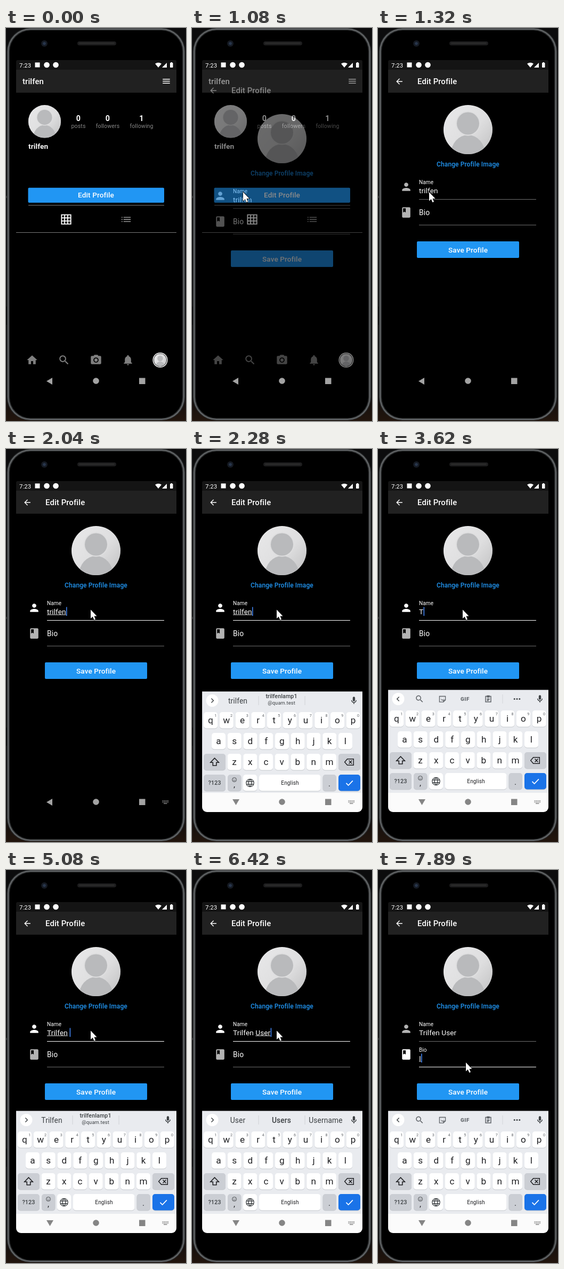
Recreate the animation shown at these times as an HTML page with a canvas. Size 338 by 735 pixels, loop 8000 ms.

```html
<!DOCTYPE html>
<html lang="en">
<head>
<meta charset="utf-8">
<title>Edit profile</title>
<style>
html, body { margin: 0; width: 100%; height: 100%; overflow: hidden; background: #0b0b0b; }
canvas { display: block; width: 338px; height: 735px; }
</style>
</head>
<body>
<canvas id="stage"></canvas>
<script>
const W = 338, H = 735, LOOP = 8000;
const BLUE = '#2196f3', GREY = '#7f7f7f', INK = '#3c4043';
const NICK = 'trilfen', MAIL = 'trilfenlamp1';
const dpr = Math.max(1, window.devicePixelRatio || 1);

const ICONS = {
  home: 'M10 20v-6h4v6h5v-8h3L12 3 2 12h3v8z',
  search: 'M15.5 14h-.79l-.28-.27C15.41 12.59 16 11.11 16 9.5 16 5.91 13.09 3 9.5 3S3 5.91 3 9.5 5.91 16 9.5 16c1.61 0 3.09-.59 4.23-1.57l.27.28v.79l5 4.99L20.49 19l-4.99-5zm-6 0C7.01 14 5 11.99 5 9.5S7.01 5 9.5 5 14 7.01 14 9.5 11.99 14 9.5 14z',
  camera: 'M9 2L7.17 4H4c-1.1 0-2 .9-2 2v12c0 1.1.9 2 2 2h16c1.1 0 2-.9 2-2V6c0-1.1-.9-2-2-2h-3.17L15 2zM12 7a5 5 0 1 0 0 10 5 5 0 0 0 0-10zM12 8.8a3.2 3.2 0 1 0 0 6.4 3.2 3.2 0 0 0 0-6.4z',
  bell: 'M12 22c1.1 0 2-.9 2-2h-4c0 1.1.89 2 2 2zm6-6v-5c0-3.07-1.64-5.64-4.5-6.32V4c0-.83-.67-1.5-1.5-1.5s-1.5.67-1.5 1.5v.68C7.63 5.36 6 7.92 6 11v5l-2 2v1h16v-1z',
  list: 'M3 11h2v2H3zM3 15h2v2H3zM3 7h2v2H3zM7 11h14v2H7zM7 15h14v2H7zM7 7h14v2H7z',
  menu: 'M3 16h18v2H3zM3 11h18v2H3zM3 6h18v2H3z',
  back: 'M20 11H7.83l5.59-5.59L12 4l-8 8 8 8 1.41-1.41L7.83 13H20z',
  person: 'M12 12c2.21 0 4-1.79 4-4s-1.79-4-4-4-4 1.79-4 4 1.79 4 4 4zm0 2c-2.67 0-8 1.34-8 4v2h16v-2c0-2.66-5.33-4-8-4z',
  book: 'M18 2H6c-1.1 0-2 .9-2 2v16c0 1.1.9 2 2 2h12c1.1 0 2-.9 2-2V4c0-1.1-.9-2-2-2zM6 4h5v8l-2.5-1.5L6 12z',
  mic: 'M12 14c1.66 0 3-1.34 3-3V5c0-1.66-1.34-3-3-3S9 3.34 9 5v6c0 1.66 1.34 3 3 3zm5-3c0 2.76-2.24 5-5 5s-5-2.24-5-5H5c0 3.53 2.61 6.43 6 6.92V21h2v-3.08c3.39-.49 6-3.39 6-6.92z',
  cursor: 'M0 0V16.5L3.8 13 6.4 19 9 17.9 6.5 12H11.5z',
  // stroked icons
  grid: 'M3 3h18v18H3zM9 3v18M15 3v18M3 9h18M3 15h18',
  shift: 'M12 3L2.5 13H8v7h8v-7h5.5z',
  erase: 'M8 5H22V19H8L2 12zM11.5 8.5l7 7M18.5 8.5l-7 7',
  globe: 'M12 2a10 10 0 1 0 0 20 10 10 0 0 0 0-20zM12 2C6.5 7 6.5 17 12 22C17.5 17 17.5 7 12 2M3.5 8.5h17M3.5 15.5h17',
  check: 'M4 12.5l5.5 5.5L20.5 6.5',
  next: 'M9.5 6l6 6-6 6',
  prev: 'M14.5 6l-6 6 6 6',
  sticker: 'M3 4h18v11l-6 6H3zM15 21v-6h6M8 9v1M15 9v1M8 13c1 3 5 3 6 1',
  clip: 'M4 4h16v17H4zM9 2.5h6v4H9zM8 11h8M8 14h8M8 17h5',
  smile: 'M12 2a10 10 0 1 0 0 20 10 10 0 0 0 0-20zM8.5 8v2M15.5 8v2M7 14c2 4 8 4 10 0'
};
for (const k in ICONS) ICONS[k] = new Path2D(ICONS[k]);

function surface(el) {
  el.width = W * dpr;
  el.height = H * dpr;
  const c = el.getContext('2d');
  c.scale(dpr, dpr);
  return c;
}
const stage = surface(document.getElementById('stage'));
const layer = surface(document.createElement('canvas'));
let g = stage;

function box(x, y, w, h, color, r = 0) {
  g.fillStyle = color;
  g.beginPath();
  g.roundRect(x, y, w, h, r);
  g.fill();
}
function disc(x, y, r, color) {
  g.fillStyle = color;
  g.beginPath();
  g.arc(x, y, r, 0, 7);
  g.fill();
}
function poly(color, ...p) {
  g.fillStyle = color;
  g.beginPath();
  for (let i = 0; i < p.length; i += 2) g.lineTo(p[i], p[i + 1]);
  g.fill();
}
function icon(name, x, y, scale, color, line = 0) {
  g.save();
  g.translate(x - 12 * scale, y - 12 * scale);
  g.scale(scale, scale);
  if (line) {
    g.strokeStyle = color;
    g.lineWidth = line;
    g.stroke(ICONS[name]);
  } else {
    g.fillStyle = color;
    g.fill(ICONS[name], 'evenodd');
  }
  g.restore();
}
// y is the middle of the capitals; returns the width
function text(s, x, y, size, color = '#fff', weight = 400, align = 'left', gap = 0.1) {
  g.font = `${weight} ${size}px Roboto, sans-serif`;
  g.letterSpacing = gap + 'px';
  g.textAlign = align;
  g.fillStyle = color;
  g.fillText(s, x, y + size * 0.355);
  return g.measureText(s).width;
}
const label = (s, x, y, size, color, weight) => text(s, x, y, size, color, weight, 'center');

// value of the last entry that has begun
function at(list, now) {
  let hit = list[0];
  for (const e of list) if (e[0] <= now) hit = e;
  return hit[1];
}
function track(keys, now) {
  let i = 0;
  while (i < keys.length - 2 && keys[i + 1][0] <= now) i++;
  const [t0, x0, y0] = keys[i], [t1, x1, y1] = keys[i + 1];
  const p = Math.min(1, (now - t0) / (t1 - t0));
  return [x0 + (x1 - x0) * p, y0 + (y1 - y0) * p];
}

const TYPED = [
  [0, NICK], [2890, 'trilfe'], [3010, 'tril'], [3130, 'tr'], [3250, ''],
  [3620, 'T'], [3990, 'Tr'], [4230, 'Tri'], [4350, 'Tril'], [4470, 'Trilf'],
  [4600, 'Trilfe'], [4840, 'Trilfen'], [5080, 'Trilfen '], [5320, 'Trilfen U'],
  [5570, 'Trilfen Us'], [5930, 'Trilfen Use'], [6180, 'Trilfen User']
];
const HINTS = [
  [0, [NICK, MAIL, '']], [3010, ['tril', 'trip', 'trial']], [3250, null],
  [3740, ['T', 'The', 'This']], [4350, ['Tri', 'Trip', 'Trial']],
  [4600, ['Trilf', 'Trill', 'Trifle']], [4840, ['Trilfen', MAIL, '']],
  [5320, ['U', 'Up', 'Us']], [5570, ['Us', 'Use', 'Using']],
  [5930, ['Use', 'User', 'Used']], [6180, ['User', 'Users', 'Username']], [6910, null]
];
const MOUSE = [
  [0, -20, 330], [240, 0, 322], [340, 14, 314], [460, 45, 303], [590, 78, 300],
  [710, 96, 307], [1335, 96, 307], [1450, 118, 303], [1680, 159, 300.5],
  [6560, 159, 300.5], [6680, 161, 316], [6800, 165, 345], [6920, 165, 360]
];
const BIO_FOCUS = 6910;

function phone() {
  box(0, 0, W, H, '#0c0c0d');
  const rust = g.createLinearGradient(0, 685, 0, H);
  rust.addColorStop(0, 'rgba(40,24,14,0)');
  rust.addColorStop(1, '#22150d');
  box(0, 685, W, 50, rust);
  box(0, 314, 2, 4, '#333');
  box(0, 521, 2, 34, '#000');
  box(1.5, 0, 335, 734, '#2b2d2e', 44);
  box(3, 1, 332, 732, '#66696b', 43);
  box(5, 3, 328, 728, '#303233', 41);
  box(7, 4.5, 324, 725, '#000', 39);
  box(134, 25, 73, 7.5, '#1d1d1e', 4);
  box(137, 27, 67, 3, '#292929', 2);
  disc(72, 29, 6, '#151a22');
  disc(72, 29, 2.8, '#28364c');
}

function avatar(x, y, r) {
  const k = r / 46;
  g.save();
  g.translate(x, y);
  g.scale(k, k);
  g.beginPath();
  g.arc(0, 0, 46, 0, 7);
  g.clip();
  const light = g.createLinearGradient(-35, -30, 35, 30);
  light.addColorStop(0, '#e6e6e7');
  light.addColorStop(0.6, '#dededf');
  light.addColorStop(1, '#cacacb');
  box(-46, -46, 92, 92, light);
  g.fillStyle = '#b9babc';
  g.beginPath();
  g.ellipse(0, 46, 32, 36, 0, 0, 7);
  g.fill();
  disc(0, -11.5, 23, '#dededf');
  disc(0, -11.5, 21, '#b9babc');
  g.restore();
}

function page(barEnd) {
  box(19, 60, 301, 583, '#000');
  box(19, 60, 301, barEnd - 60, '#212121');
}

function profile() {
  page(121);
  text(NICK, 31, 100, 14.9, '#fff', 500);
  icon('menu', 301, 99.5, 0.75, '#fff');
  avatar(72.5, 174.8, 30.7);
  [['0', 'posts', 136], ['0', 'followers', 191], ['1', 'following', 254.5]].forEach(([n, s, x]) => {
    label(n, x, 169, 14.3, '#fff', 700);
    label(s, x, 183, 10.6, '#868686');
  });
  text(NICK, 42, 221.5, 13.6, '#fff', 700);
  box(41.5, 298.7, 255.5, 28, BLUE, 2);
  label('Edit Profile', 169, 312.4, 13.6, '#fff', 500);
  box(42, 331, 255, 1, '#7a7a7a');
  icon('grid', 113, 358, 0.96, '#fff', 2);
  icon('list', 225.5, 358, 0.96, GREY);
  box(19, 382, 301, 1, '#7a7a7a');
  ['home', 'search', 'camera', 'bell'].forEach((n, i) => icon(n, 49 + 60 * i, 621, 0.97, GREY));
  disc(289.5, 621, 14, '#fff');
  disc(289.5, 621, 12.6, '#222');
  avatar(289.5, 621, 11.7);
}

function field(y, value, focused, composing, caret) {
  const w = value ? text(value, 77, y, 13.6) : 0;
  const words = value.trimEnd();
  if (composing && words) {
    const start = words.lastIndexOf(' ') + 1;
    const x0 = g.measureText(words.slice(0, start)).width;
    box(77 + x0, y + 5.5, g.measureText(words).width - x0, 1, '#e8e8e8');
  }
  if (focused && caret) box(77 + w + 0.3, y - 8.5, 1.6, 16.5, '#4285f4');
  box(77, y + 16, 220, 1, focused ? '#fff' : '#6f6f6f');
}

function editPage(now, shift) {
  const onName = now >= 1920 && now < BIO_FOCUS, onBio = now >= BIO_FOCUS;
  page(121 - shift);
  icon('back', 40, 100, 0.73, '#fff');
  text('Edit Profile', 74, 100, 14.9, '#fff', 500);
  avatar(169, 190, 46);
  label('Change Profile Image', 169, 254.5, 12, BLUE, 500);

  icon('person', 53, 297, 0.97, onName ? '#fff' : '#b3b3b3');
  text('Name', 77, 288, 10);
  const composing = onName && now >= 2040 && !(now >= 3250 && now < 3740);
  field(304, at(TYPED, now), onName, composing, !(now >= 2640 && now < 2890));

  icon('book', 53, 345, 0.97, onBio ? '#fff' : '#b3b3b3');
  const lift = Math.max(0, Math.min(1, (now - 6850) / 170));
  text('Bio', 77, 345 - 9 * lift, 13.8 - 3.8 * lift);
  field(352, now >= 7640 ? 'I' : '', onBio, onBio, true);

  box(73, 399, 192, 31, BLUE, 2);
  label('Save Profile', 169, 414.7, 13.6, '#fff', 500);
}

function statusBar() {
  box(19, 60, 301, 18, '#141414');
  text('7:23', 25, 69.5, 11.3);
  box(54.5, 64.5, 9, 9, '#fff');
  disc(76.5, 69, 5.3, '#fff');
  disc(93.5, 69, 5.3, '#fff');
  g.fillStyle = '#fff';
  g.beginPath();
  g.moveTo(286, 74);
  g.lineTo(280, 66.8);
  g.quadraticCurveTo(286, 62.6, 292, 66.8);
  g.fill();
  poly('#fff', 293, 74, 302, 74, 302, 65);
  box(308, 65, 5.5, 9, '#fff', 1);
  box(309.5, 64, 2.5, 2, '#fff');
}

function navBar(now) {
  const light = now >= 2160;
  const c = light ? '#858585' : '#a3a3a3';
  box(19, 643, 301, 36, light ? '#fbfbfb' : '#000');
  if (light) poly(c, 76, 655, 89, 655, 82.5, 666);
  else poly(c, 76, 660.5, 87, 654, 87, 667);
  disc(169, 660, 5.8, c);
  box(250, 654.5, 11.5, 11.5, c);
  if (now < 2040) return;
  for (let r = 0; r < 2; r++)
    for (let i = 0; i < 5; i++) box(293.5 + i * 2.5, 657 + r * 2.6, 1.6, 1.6, '#858585');
  box(296, 662.2, 6.5, 1.5, '#858585');
}

function key(x, y, w, color = '#fff') {
  box(x, y - 14.5, w, 30.5, '#c6c9ce', 5);
  box(x, y - 15.5, w, 30.5, color, 5);
}

function strip(hints) {
  disc(38, 467.5, 11.5, '#fff');
  icon(hints ? 'next' : 'prev', 38, 467.5, 0.65, INK, 2.2);
  icon('mic', 304, 467.5, 0.72, INK);
  if (!hints) {
    icon('search', 78, 467.5, 0.75, '#5f6368');
    icon('sticker', 121, 467.5, 0.62, '#5f6368', 2.2);
    text('GIF', 163.5, 467.5, 9.8, '#5f6368', 900, 'center', 0.7);
    icon('clip', 207, 467.5, 0.62, '#5f6368', 2.4);
    box(233.5, 459, 1, 17, '#d3d6da');
    for (let i = -1; i < 2; i++) disc(261 + i * 4.8, 467.5, 1.5, INK);
    return;
  }
  const [left, mid, right] = hints;
  label(left, 86, 468, 13.8, INK);
  if (mid === MAIL) {
    label(MAIL, 168, 459, 10.7, INK, 500);
    label('@quam.test', 168, 472, 9.4, INK);
  } else label(mid, 168, 468, 13.8, INK, 500);
  label(right, 251, 468, 13.8, INK);
  box(124.5, 459, 1, 17, '#cfd2d6');
  box(211.5, 459, 1, 17, '#cfd2d6');
}

function keyboard(now) {
  if (now < 2160) return;
  const drop = at([[2160, 70], [2280, 3], [2400, 0]], now);
  const caps = now >= 7030 && now < 7640;
  const soft = '#cbced4', dark = '#202124';
  g.save();
  g.beginPath();
  g.rect(19, 60, 301, 583);
  g.clip();
  g.translate(0, drop);
  box(19, 450.5, 301, 193, '#e9ebef');
  strip(at(HINTS, now));

  [['qwertyuiop', 35, 504.5], ['asdfghjkl', 50, 543.5], ['zxcvbnm', 79.5, 582.5]].forEach(([row, x0, y], r) => {
    [...row].forEach((ch, i) => {
      const x = x0 + 29.75 * i;
      key(x - 13, y, 26);
      label(caps ? ch.toUpperCase() : ch, x, caps ? y : y - 0.3, 17.2, dark);
      if (!r) label(String((i + 1) % 10), x + 9.3, y - 9.3, 7.2, '#5f6368');
    });
  });
  key(22, 582.5, 41, soft);
  if (caps) icon('shift', 42.5, 582.5, 0.82, dark);
  icon('shift', 42.5, 582.5, 0.82, dark, 1.9);
  key(275, 582.5, 41, soft);
  icon('erase', 295, 582.5, 0.83, dark, 1.8);

  const y = 621.5;
  key(22, y, 41, soft);
  label('?123', 42.5, y, 10.8, INK, 500);
  key(67, y, 25.5, soft);
  icon('smile', 79.5, y - 6, 0.4, INK, 2.3);
  label(',', 79.5, y + 3, 15, dark);
  key(96, y, 26);
  icon('globe', 109, y, 0.72, INK, 1.8);
  key(126, y, 115.5);
  label('English', 184, y, 10.1, dark);
  key(245.5, y, 25.5, soft);
  label('.', 258, y + 1, 15, dark);
  key(275, y, 41, '#1a73e8');
  icon('check', 295.5, y, 0.75, '#fff', 2.2);
  g.restore();
}

function draw(now) {
  const p = Math.max(0, Math.min(1, (now - 970) / 210));
  const shift = 155 * (1 - p) ** 2.6;
  if (p > 0) {
    g = layer;
    g.clearRect(0, 0, W, H);
    editPage(now, shift);
  }
  g = stage;
  phone();
  g.save();
  g.beginPath();
  g.roundRect(19, 60, 301, 619, [4, 4, 9, 9]);
  g.clip();
  if (p < 1) profile();
  if (p > 0) {
    g.globalAlpha = p ** 1.4;
    g.drawImage(layer.canvas, 0, shift, W, H);
    g.globalAlpha = 1;
  }
  statusBar();
  keyboard(now);
  navBar(now);
  g.restore();

  const [mx, my] = track(MOUSE, now);
  g.save();
  g.translate(mx, my);
  g.fillStyle = '#fff';
  g.strokeStyle = '#000';
  g.lineWidth = 1.4;
  g.stroke(ICONS.cursor);
  g.fill(ICONS.cursor);
  g.restore();
}

// the picture advances in even ticks after a short hold
const TICK = 121.5, HOLD = 205;
const stepped = t => t < HOLD ? 0 : HOLD + 35 + TICK * Math.floor((t - HOLD) / TICK);

const begin = performance.now();
function run() {
  draw(stepped((performance.now() - begin) % LOOP));
  requestAnimationFrame(run);
}
run();
</script>
</body>
</html>
```
